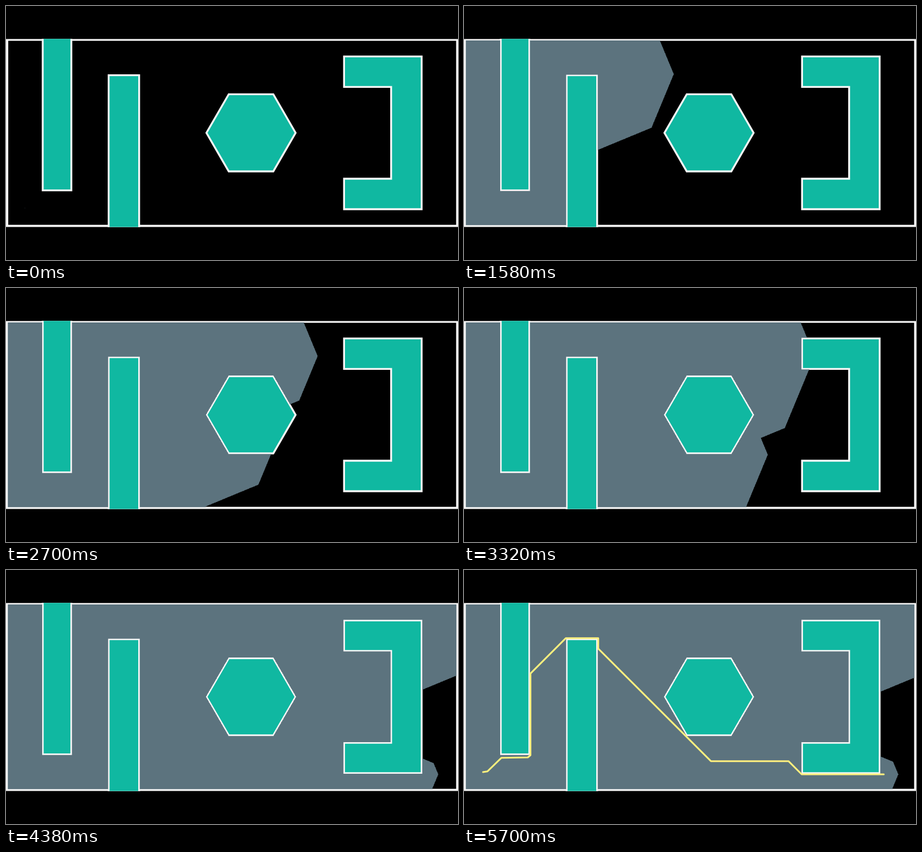
These frames come from a looping animation (800x450 px, 5.72 s). An HTML page with a canvas:

```html
<!DOCTYPE html>
<html>
<head>
<meta charset="utf-8">
<style>
html, body { margin: 0; width: 100%; height: 100%; overflow: hidden; background: #000; }
canvas { display: block; }
</style>
</head>
<body>
<canvas id="stage" width="800" height="450"></canvas>
<script>
const W = 1200, H = 500, GAP = 5;
const LOOP = 5720, STEP = 20, SEARCH_END = 4391;
const WHITE = '#f6f6f6', TEAL = '#10b8a1', YELLOW = '#fff07e';
const GRAY = 0xff7e735c; // ABGR

// Map of whole cells, y pointing up; rectangles include their far edges
const rects = [[100, 100, 170, 500], [275, 0, 350, 400], [1025, 50, 1100, 450]];
for (const y of [50, 375]) rects.push([900, y, 1100, y + 75]);
const hex = { x: 650, y: 250, r: 100 };

function blocked(x, y) {
  if (x <= GAP || y <= GAP || x >= W - GAP || y >= H - GAP) return true;
  if (rects.some(([a, b, c, d]) =>
    x >= a - GAP && x <= c + GAP && y >= b - GAP && y <= d + GAP)) return true;
  const dx = Math.abs(x - hex.x), dy = Math.abs(y - hex.y);
  return Math.max(dy, dy / 2 + dx * Math.sqrt(3) / 2) <= hex.r + GAP;
}

const cell = (x, y) => y * W + x;
const dist = new Float64Array(W * H).fill(Infinity);
const open = Uint8Array.from(dist, (_, i) => blocked(i % W, Math.floor(i / W)) ? 0 : 1);
dist[cell(50, 50)] = 0;

// Eight-way shortest distances, swept back and forth until stable
function sweep(dir) {
  let changed = false;
  const n = W * H, diag = Math.SQRT2;
  for (let k = 0; k < n; k++) {
    const i = dir > 0 ? k : n - 1 - k;
    if (!open[i]) continue;
    const row = i - dir * W;
    const d = Math.min(dist[i - dir] + 1, dist[row] + 1, dist[row - 1] + diag, dist[row + 1] + diag);
    if (d < dist[i] - 1e-6) { dist[i] = d; changed = true; }
  }
  return changed;
}
for (let more = true; more;) {
  const a = sweep(1), b = sweep(-1);
  more = a || b;
}

// The searched area grows steadily between key points of [time, distance reached]
const sorted = dist.filter(isFinite).sort();
const reach = dist[cell(1150, 50)];
const keys = [[0, 0], [720, 321.5], [1580, 781], [2700, 1051.5], [3920, 1270], [SEARCH_END, reach]]
  .map(([t, r]) => [t, Math.max(0, sorted.findIndex(d => d > r) - 1)]);

function radius(t) {
  if (t >= SEARCH_END) return reach;
  const k = keys.findIndex(([time]) => time > t);
  const [t0, n0] = keys[k - 1], [t1, n1] = keys[k];
  return sorted[Math.floor(n0 + (n1 - n0) * (t - t0) / (t1 - t0))];
}

// Searched cells spill one cell into the clearance
const shade = dist.slice();
for (let i = W; i < W * (H - 1); i++) {
  if (open[i]) continue;
  for (const row of [-W, 0, W])
    for (let c = -1; c < 2; c++) shade[i] = Math.min(shade[i], dist[i + row + c]);
}

const layer = document.createElement('canvas');
layer.width = W;
layer.height = H;
const layerCtx = layer.getContext('2d');
const image = layerCtx.createImageData(W, H);
const pixels = new Uint32Array(image.data.buffer);

const ctx = document.getElementById('stage').getContext('2d');

function obstacles(color, m) {
  const r = (hex.r + m) * 2 / Math.sqrt(3);
  ctx.fillStyle = color;
  ctx.beginPath();
  for (const [a, b, c, d] of rects) ctx.rect(a - m, b - m, c - a + 2 * m + 1, d - b + 2 * m + 1);
  for (let k = 0; k < 6; k++) {
    const x = hex.x + 0.5 + r * Math.cos(k * Math.PI / 3);
    const y = hex.y + 0.5 + r * Math.sin(k * Math.PI / 3);
    if (k) ctx.lineTo(x, y); else ctx.moveTo(x, y);
  }
  ctx.fill();
}

// Turning points of the shortest route
const route = [
  [50, 50], [62, 52], [99, 88], [169, 89], [176, 95], [176, 312], [270, 406],
  [356, 406], [356, 378], [655, 79], [861, 79], [896, 44], [1150, 44]
];

// One cell per step, straight or diagonal
function drawRoute(steps) {
  if (steps <= 0) return;
  ctx.strokeStyle = YELLOW;
  ctx.lineWidth = 4.5;
  ctx.lineCap = ctx.lineJoin = 'round';
  ctx.beginPath();
  ctx.moveTo(...route[0]);
  for (let k = 1; k < route.length && steps > 0; k++) {
    const [x0, y0] = route[k - 1], [x1, y1] = route[k];
    const n = Math.max(Math.abs(x1 - x0), Math.abs(y1 - y0));
    const f = Math.min(1, steps / n);
    ctx.lineTo(x0 + (x1 - x0) * f, y0 + (y1 - y0) * f);
    steps -= n;
  }
  ctx.stroke();
}

function draw() {
  const now = performance.now() % LOOP;
  const t = now - now % STEP, r = radius(t);
  for (let i = 0; i < pixels.length; i++) pixels[i] = shade[i] <= r ? GRAY : 0;
  layerCtx.putImageData(image, 0, 0);

  ctx.fillStyle = '#000';
  ctx.fillRect(0, 0, 800, 450);
  ctx.save();
  ctx.setTransform(2 / 3, 0, 0, -2 / 3, 0, 225 + H / 3);
  ctx.beginPath();
  ctx.rect(0, 0, W, H);
  ctx.clip();
  ctx.fillStyle = WHITE;
  ctx.fillRect(0, 0, W, H);
  ctx.fillStyle = '#000';
  ctx.fillRect(GAP + 1, GAP + 1, W - 2 * GAP - 1, H - 2 * GAP - 1);
  obstacles(WHITE, GAP);
  ctx.drawImage(layer, 0, 0);
  obstacles(TEAL, 0);
  ctx.translate(0.5, 0.5);
  drawRoute(t - SEARCH_END);
  ctx.restore();

  requestAnimationFrame(draw);
}
draw();
</script>
</body>
</html>
```
